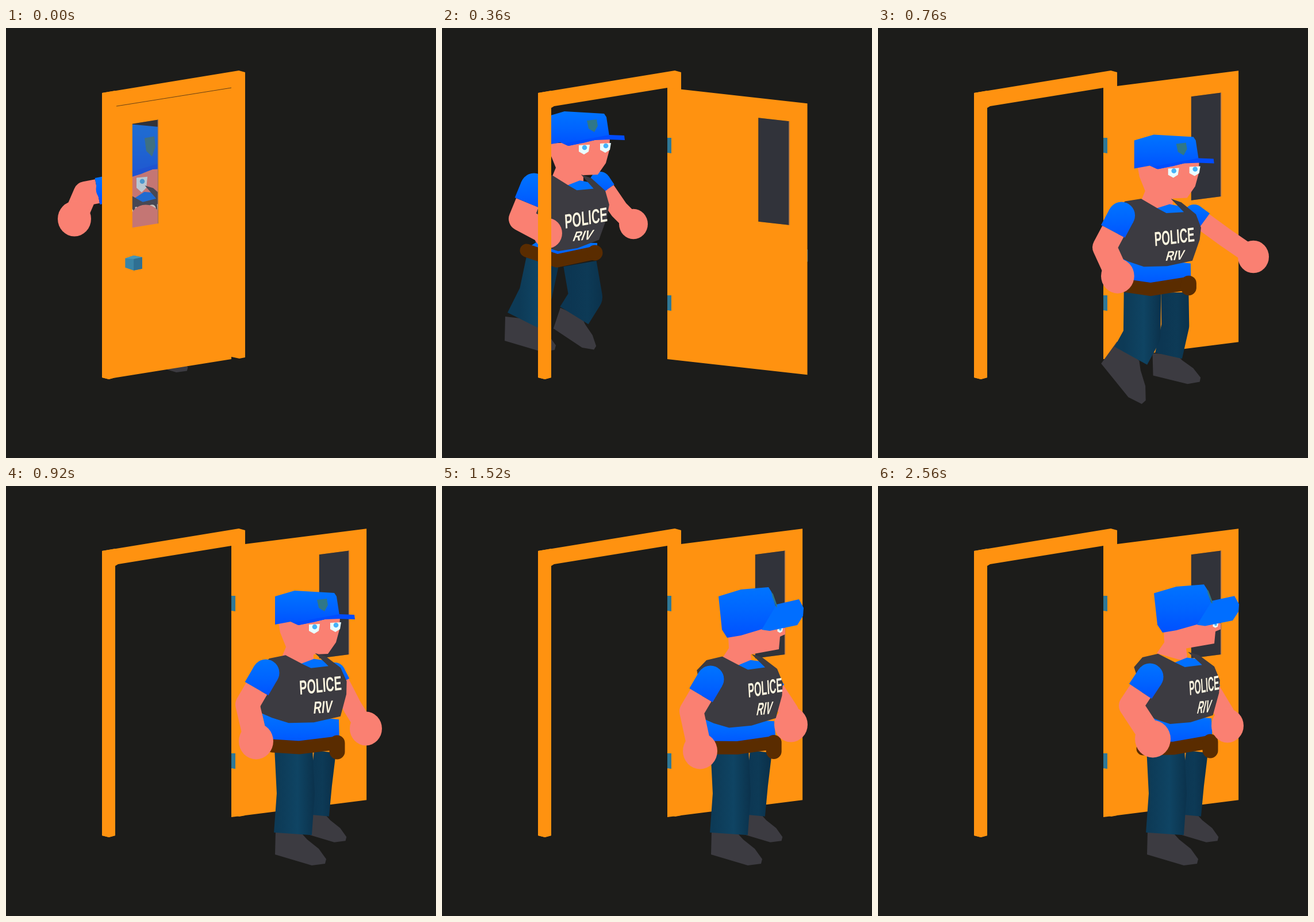
These frames come from a looping animation (748x748 px, 2660 ms). An HTML page with a canvas:

```html
<!DOCTYPE html>
<html lang="en">
<head>
<meta charset="utf-8">
<title>Officer at the door</title>
<style>
html, body { margin: 0; width: 100%; height: 100%; overflow: hidden; background: #1c1c1a; }
canvas { display: block; width: 100%; height: 100%; }
</style>
</head>
<body>
<canvas id="stage" width="748" height="748"></canvas>
<script>
const ctx = document.getElementById('stage').getContext('2d');
const ORANGE = '#ff9210', SKIN = '#fa8072', DARK = '#3c3b41';
const clamp = v => Math.min(1, Math.max(0, v));
const mix = (a, b, u) => a + (b - a) * u;
const ease = u => u * u * (3 - 2 * u);

// Rows are [time, ...values]; monotone cubic between them, without overshoot.
const track = (...rows) => t => {
  const k = rows.findIndex(row => row[0] > t) - 1;
  if (k < 0) return rows[rows.length - 1].slice(1);
  const span = rows[k + 1][0] - rows[k][0], u = (t - rows[k][0]) / span, v = 1 - u;
  return rows[k].slice(1).map((a, i) => {
    const slope = j => rows[j] && rows[j + 1]
      ? (rows[j + 1][i + 1] - rows[j][i + 1]) / (rows[j + 1][0] - rows[j][0]) : 0;
    const tangent = j => {
      const p = slope(j - 1), q = slope(j);
      return p * q > 0 ? 2 * p * q / (p + q) : 0;
    };
    return mix(a, rows[k + 1][i + 1], ease(u)) + span * u * v * (v * tangent(k) - u * tangent(k + 1));
  });
};

// corners of the chest: shoulders, then waist
const chestAt = track(
  [0, 180, 290, 278, 298, 180, 395, 280, 395],
  [360, 165, 262, 284, 283, 165, 372, 270, 374],
  [600, 368, 303, 490, 332, 365, 400, 470, 413],
  [920, 458, 300, 582, 316, 445, 394, 579, 406],
  [1520, 460, 303, 583, 318, 456, 404, 578, 409],
  [2000, 463, 300, 587, 318, 463, 405, 580, 410],
  [2560, 460, 298, 585, 314, 467, 397, 580, 404]);
const beltAt = track(
  [0, 190, 412, 230, 422, 280, 412],
  [360, 147, 387, 200, 405, 266, 391],
  [600, 346, 437, 400, 454, 466, 437],
  [920, 463, 452, 510, 455, 576, 447],
  [2560, 461, 457, 515, 456, 578, 445]);
// baseline origin and the vector of four ems
const titleAt = track(
  [0, 190, 340, 95, -12], [360, 214, 349, 80, -14], [600, 424, 396, 71, -10],
  [920, 511, 363, 79, -9], [1520, 533, 368, 64, -11], [2000, 541, 370, 58, -13], [2560, 542, 364, 56, -11]);
// baseline origin, lean and height of one em
const unitAt = track(
  [0, 215, 358, 5, 18], [360, 226, 371, 9, 24], [600, 430, 414, 10, 18],
  [920, 534, 396, 3, 30], [1520, 546, 399, 6, 31], [2000, 552, 400, 7, 31], [2560, 554, 396, 7, 31]);
// shoulder, elbow, fist and fist radius
const nearArmAt = track(
  [0, 180, 280, 138, 288, 119, 332, 29],
  [360, 160, 276, 137, 332, 184, 357, 25],
  [600, 366, 327, 341, 383, 379, 411, 27],
  [920, 452, 325, 420, 380, 435, 444, 30],
  [1520, 467, 336, 434, 392, 449, 461, 30],
  [2000, 473, 336, 439, 390, 461, 460, 31],
  [2560, 473, 332, 440, 382, 478, 440, 31]);
const farArmAt = track(
  [0, 290, 330, 270, 345, 243, 338, 29],
  [360, 275, 268, 308, 316, 333, 341, 25],
  [600, 480, 325, 515, 375, 544, 404, 26],
  [760, 550, 325, 605, 365, 653, 398, 27],
  [920, 572, 325, 603, 385, 626, 422, 28],
  [1520, 570, 340, 604, 392, 607, 415, 29],
  [2560, 570, 340, 603, 395, 608, 417, 28]);
// hip, knee, ankle, width, then angle and scale of the shoe
const nearLegAt = track(
  [0, 205, 425, 210, 480, 205, 530, 40, 0, .8],
  [360, 175, 405, 163, 462, 140, 508, 58, 0, 1],
  [600, 378, 450, 369, 535, 330, 526, 62, 1.2, 1.25],
  [920, 500, 455, 504, 535, 499, 605, 66, 0, 1]);
const farLegAt = track(
  [0, 260, 430, 285, 500, 270, 555, 50, 0, .8],
  [360, 240, 410, 250, 468, 230, 500, 58, .3, .9],
  [600, 437, 455, 451, 512, 428, 562, 58, -.1, 1],
  [920, 555, 462, 548, 520, 543, 573, 38, 0, .85]);
// offset and vertical scale
const headAt = track(
  [0, -300, 20, 1.6], [360, -289, -37, 1], [600, -74, 7, 1], [920, 0, 0, 1],
  [1520, 0, 0, 1], [2000, 1, -2, 1], [2560, -1, -8, .95]);

// Head outlines, facing forward and turned away
const crown = [
  [468, 192, 502, 182, 571, 186, 575, 192, 580, 225, 535, 237, 508, 242, 495, 236, 468, 241],
  [481, 192, 520, 180, 568, 176, 573, 184, 588, 236, 560, 248, 520, 260, 496, 264, 487, 250]];
const visor = [
  [500, 238, 580, 223, 606, 224, 607, 232, 580, 231, 555, 232, 510, 242],
  [556, 250, 582, 206, 621, 197, 629, 212, 628, 226, 618, 242, 570, 252]];
const badge = [
  [541, 198, 558, 196, 560, 207, 554, 218, 544, 212],
  [573, 184, 576, 188, 583, 208, 582, 212, 575, 194]];
const face = [
  [474, 238, 545, 234, 581, 226, 580, 250, 574, 272, 560, 292, 535, 293, 535, 318, 478, 302, 487, 280, 477, 255],
  [497, 255, 570, 240, 597, 247, 597, 258, 588, 262, 586, 284, 537, 293, 540, 318, 486, 302, 499, 282, 498, 262]];
const eye = [-9, -7, 10, -8, 8, 4, 0, 9, -9, 4];
const shoe = [-30, -6, 15, -1, 25, 10, 45, 26, 58, 44, 56, 52, 33, 55, -31, 36];
// Fractions of the chest
const vest = [-.13, .19, 0, 0, .22, -.1, .48, .03, .59, .08, .83, 0, .63, -.21, .78, -.18, 1, 0,
  1.09, .25, 1.09, .5, 1.02, .94, .68, 1.1, .36, 1.15, .14, 1.08, -.03, 1, -.03, .69];
const collar = [.45, .02, .62, -.1, .8, -.1, .85, 0, .6, .1];

function trace(pts) {
  for (let i = 0; i < pts.length; i += 2) ctx[i ? 'lineTo' : 'moveTo'](pts[i], pts[i + 1]);
}

function poly(pts, fill) {
  ctx.beginPath();
  trace(pts);
  ctx.fillStyle = fill;
  ctx.fill();
}

function ribbon(pts, color, width, cap = 'butt') {
  ctx.beginPath();
  trace(pts);
  Object.assign(ctx, { strokeStyle: color, lineWidth: width, lineCap: cap, lineJoin: 'round' });
  ctx.stroke();
}

function blob(x, y, rx, ry, fill) {
  ctx.beginPath();
  ctx.ellipse(x, y, rx, ry, 0, 0, 7);
  ctx.fillStyle = fill;
  ctx.fill();
}

// Map each point pair of an outline.
const mapPoints = (pts, f) => pts.flatMap((x, i) => i % 2 ? [] : f(x, pts[i + 1]));

function blue(pts) {
  const ys = pts.filter((_, i) => i % 2);
  const g = ctx.createLinearGradient(0, Math.min(...ys), 0, Math.max(...ys));
  ['#0074ff', '#0064ff', '#0050ff'].forEach((c, i) => g.addColorStop(i / 2, c));
  return g;
}

function label(text, x, y, dx, dy, lean, height) {
  ctx.save();
  ctx.transform(dx / 400, dy / 400, -lean / 100, height / 100, x, y);
  ctx.font = 'bold 100px "Liberation Sans", Arial, sans-serif';
  ctx.fillStyle = '#fdf6e0';
  ctx.fillText(text, 0, 0);
  ctx.restore();
}

function drawLeg([hx, hy, kx, ky, ax, ay, width, angle, size], edge, middle) {
  const c = Math.cos(angle) * size, s = Math.sin(angle) * size;
  poly(mapPoints(shoe, (x, y) => [ax + x * c - y * s, ay + x * s + y * c]), DARK);
  const g = ctx.createLinearGradient(kx - width / 2, 0, kx + width / 2, 0);
  g.addColorStop(0, edge);
  g.addColorStop(.55, middle);
  g.addColorStop(1, '#0b324c');
  ribbon([hx, hy, kx, ky, ax, ay], g, width);
}

function drawArm([sx, sy, ex, ey, fx, fy, r], width, reach, sleeve) {
  const hx = mix(sx, ex, reach), hy = mix(sy, ey, reach);
  ribbon([hx, hy, ex, ey, fx, fy], SKIN, width);
  blob(fx, fy, r, r * 1.05, SKIN);
  const fill = blue([0, sy - sleeve / 2, 0, hy + sleeve / 3]);
  blob(sx, sy, sleeve / 2, sleeve / 2, fill);
  ribbon([sx, sy, hx, hy], fill, sleeve);
}

function drawHead(t, turn) {
  const [dx, dy, tall] = headAt(t);
  const place = (x, y) => [x + dx, 242 + dy + (y - 242) * tall];
  const shape = ([a, b]) => mapPoints(a.map((v, i) => mix(v, b[i], turn)), place);
  const drawEye = (x, y, size) => {
    poly(mapPoints(eye, (a, b) => place(x + a * size, y + b * size)), '#eafcff');
    blob(...place(x + size, y - 3 * size), 4.3 * size, 4.3 * size, '#45b2f8');
  };
  poly(shape(face), SKIN);
  drawEye(mix(536, 564, turn), mix(248, 236, turn), 1 - turn / 2);
  drawEye(mix(573, 588, turn), mix(245, 251, turn), 1 - turn / 2);
  return () => {
    const cap = shape(crown);
    poly(cap, blue(cap));
    poly(shape(visor), `rgb(0,${mix(76, 110, turn)},255)`);
    poly(shape(badge), '#2f7788');
  };
}

function drawOfficer(t) {
  const [lx, ly, rx, ry, wx, wy, vx, vy] = chestAt(t);
  const onChest = (u, v) => [mix(mix(lx, rx, u), mix(wx, vx, u), v), mix(mix(ly, ry, u), mix(wy, vy, u), v)];
  const farArm = () => drawArm(farArmAt(t), 33, .3, 36);
  const belt = beltAt(t), turn = ease(clamp((t - 920) / 600));
  drawLeg(farLegAt(t), '#0c3652', '#0d3a56');
  drawLeg(nearLegAt(t), '#0d3a56', '#0f4463');
  const shirt = [wx, wy, vx, vy, belt[4] + 4, belt[5], belt[2], belt[3], belt[0] - 5, belt[1]];
  poly(shirt, blue(shirt));
  ribbon(belt, '#5a2c00', 23, 'round');
  const holster = 15 * clamp((t - 600) / 320);
  ribbon([belt[4], belt[5], belt[4], belt[5] + holster], '#5a2c00', 27, 'round');
  if (t >= 240) farArm();
  const drawCap = drawHead(t, turn);
  poly(mapPoints(collar, onChest), '#0070ff');
  poly(mapPoints(vest, onChest), DARK);
  const [x, y, dx, dy] = titleAt(t), [ux, uy, lean, height] = unitAt(t);
  label('POLICE', x, y, dx, dy, -2, 35);
  label('RIV', ux, uy, dx, dy * .6, lean, height);
  if (t < 240) farArm();
  drawCap();
  drawArm(nearArmAt(t), 42, .5, 47);
}

function drawKnob(x, y, w) {
  poly([x - w, y - 8, x, y - 13, x + w, y - 10, x + w, y + 10, x, y + 13, x - w, y + 8], '#3a84a5');
  poly([x, y - 7, x + w, y - 10, x + w, y + 10, x, y + 13], '#2f6f92');
  poly([x - w, y - 8, x, y - 13, x + w, y - 10, x, y - 7], '#4a96b4');
}

function drawDoor(angle) {
  const cos = Math.cos(angle), sin = Math.sin(angle), slip = Math.max(0, -cos);
  const dx = 282 * cos, dy = 54 * sin - 7 * slip, front = cos < 0;
  const panel = (f, g, top, bottom, shift) => {
    const a = 392 + f * dx + shift, b = 392 + g * dx + shift;
    return [a, top + f * dy, b, top + g * dy, b, bottom + g * dy, a, bottom + f * dy];
  };
  const knob = () => drawKnob(392 + .93 * dx + 27 * sin, 375 + .93 * dy - 5 * cos, 4 + 15 * slip);
  const glass = panel(.65, .87, 138.5, 319, 6 * slip);
  if (!front) knob();
  ctx.beginPath();
  trace(panel(0, 1, 104, 576, 0));
  ctx.closePath();
  trace(glass);
  ctx.fillStyle = ORANGE;
  ctx.fill('evenodd');
  poly(glass, 'rgba(93,97,120,.34)');
  const i = front ? 0 : 2;
  ribbon([glass[i], glass[i + 1], glass[6 - i], glass[7 - i]], '#a8744e', 1.5);
  if (front) knob();
  else for (const y of [191, 465]) poly([392, y, 399, y, 399, y + 27, 392, y + 26], '#2f7896');
}

function draw(t) {
  const swing = ease(clamp((t - 80) / 480));
  const angle = (136 - 169.5 * swing) * Math.PI / 180;
  const closed = Math.cos(angle) < 0;
  ctx.fillStyle = '#1c1c1a';
  ctx.fillRect(0, 0, 748, 748);
  poly([167, 113, 405, 74, 416, 77, 416, 573, 406, 575, 392, 572, 392, 104, 195, 136, 190, 139,
    190, 608, 179, 611, 167, 608], ORANGE);
  if (!closed) drawDoor(angle);
  drawOfficer(t);
  poly([167, 113, 190, 109, 190, 608, 179, 611, 167, 608], ORANGE);
  if (closed) drawDoor(angle);
  if (!swing) ribbon([192, 136, 392, 104], '#6b4315', 1);
}

function tick() {
  const t = performance.now() % 2660;
  draw(Math.min(2560, Math.floor(t / 40) * 40));
  requestAnimationFrame(tick);
}
tick();
</script>
</body>
</html>
```
